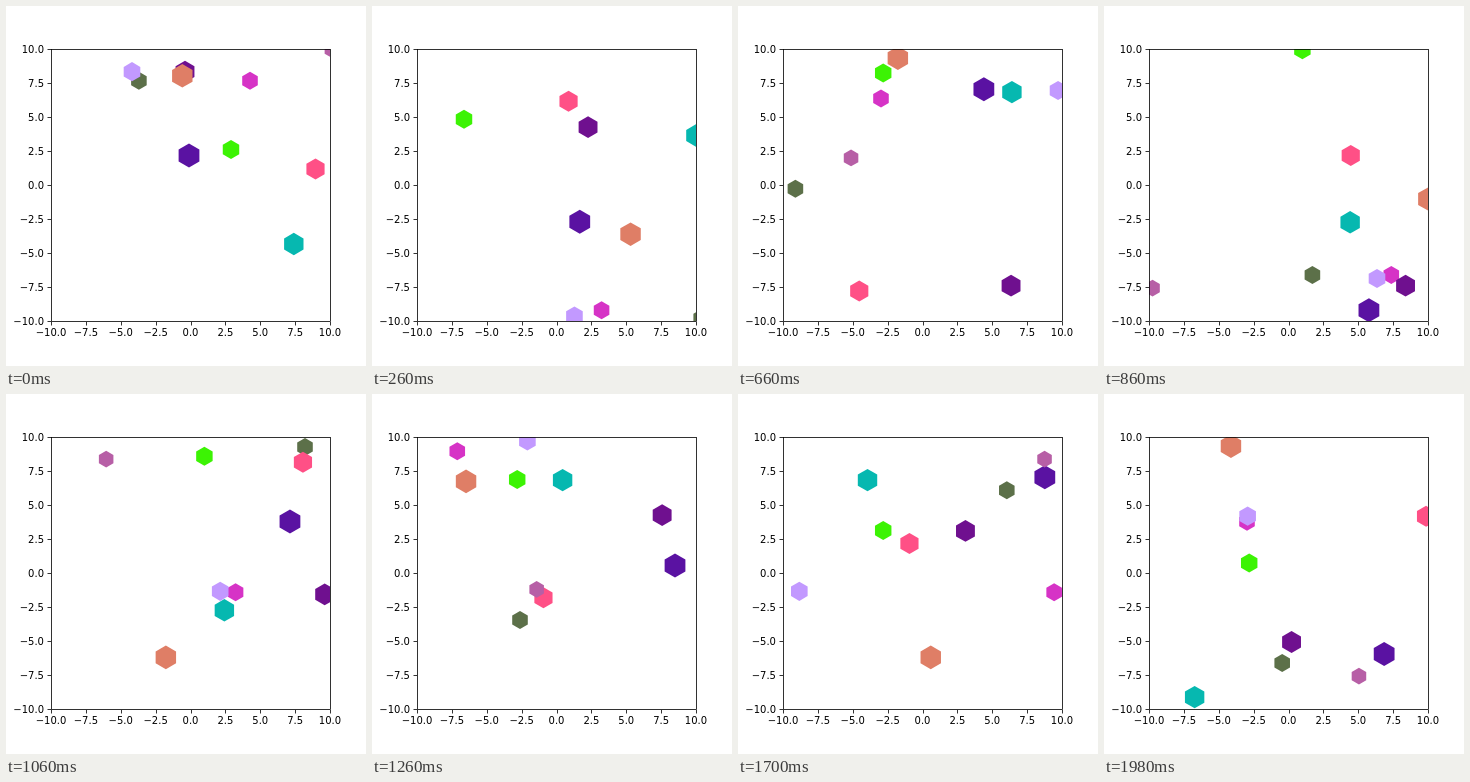
Recreate the animation shown at these times as an HTML page. Size 360 by 360 pixels, loop 2 s.

```html
<!DOCTYPE html>
<html lang="en">
<head>
<meta charset="utf-8">
<title>Bouncing hexagons</title>
<style>
  html, body { margin: 0; width: 100%; height: 100%; overflow: hidden; background: #fff; }
  svg { display: block; width: 100vw; height: 100vh; }
  text { font: 10px "DejaVu Sans", sans-serif; }
  .axes { fill: none; stroke: #000; stroke-width: .8; }
</style>
</head>
<body>
<svg viewBox="0 0 360 360">
  <clipPath id="plot"><rect x="45" y="43" width="279" height="272"/></clipPath>
  <g id="hexagons" clip-path="url(#plot)"></g>
  <path id="ticks" class="axes"/>
  <rect class="axes" x="45.5" y="43.5" width="279" height="272"/>
  <g id="labels"></g>
</svg>
<script>
const STEP = 20, STEPS = 100;
const LEFT = 45, RIGHT = 324, TOP = 43.2, BOTTOM = 315;

// Back to front: colour, radius, start x and y, velocity per step.
const bodies = [
  ['#5c7049', 9, 132.9, 74.7, 15.1, 21.6],
  ['#d633c6', 9, 244, 74.8, 14.43, 17.65],
  ['#6f108f', 10.9, 179, 65.6, 2.85, -7.93],
  ['#df7e66', 11.8, 176.3, 69.8, 16.45, -17.6],
  ['#c299ff', 9.6, 126, 65.7, 5.88, 18.8],
  ['#5a12a2', 12, 183, 149.5, 1.905, -22.1],
  ['#3cf304', 9.5, 225, 143.5, 26.6, -2.32],
  ['#ff5086', 10.5, 309.5, 163, 12.55, -13.55],
  ['#06b8b0', 11.2, 287.8, 238, -0, -21.7],
  ['#b75fa6', 8.4, 325.9, 43.45, -6.45, 21.7]
].map(([color, radius, x, y, vx, vy]) => ({ color, radius, x, y, vx, vy }));
bodies[8].vx = 2.777;

function add(parent, tag, attributes) {
  const node = document.createElementNS('http://www.w3.org/2000/svg', tag);
  for (const name in attributes) node.setAttribute(name, attributes[name]);
  return document.getElementById(parent).appendChild(node);
}

// A body turns round only after it has passed the edge.
function bounce(position, velocity, low, high, steps) {
  for (let i = 0; i < steps; i++) {
    position += velocity;
    if (position > high) velocity = -Math.abs(velocity);
    if (position < low) velocity = Math.abs(velocity);
  }
  return position;
}

function hexagon(radius) {
  return Array.from({ length: 6 }, (_, i) => {
    const angle = i * Math.PI / 3;
    return [radius * Math.sin(angle), radius * Math.cos(angle)].map(n => n.toFixed(2));
  }).join(' ');
}

function drawAxes() {
  let ticks = '';
  for (let i = 0; i <= 8; i++) {
    const x = LEFT + (RIGHT - LEFT) * i / 8;
    const y = BOTTOM - (BOTTOM - TOP) * i / 8;
    const value = (i * 2.5 - 10).toFixed(1).replace('-', '\u2212');
    ticks += `M${Math.round(x) + .5} 316v3.5M45 ${Math.round(y) + .5}h-3.5`;
    add('labels', 'text', { x, y: 330, 'text-anchor': 'middle' }).textContent = value;
    add('labels', 'text', { x: 38, y: y + 3.8, 'text-anchor': 'end' }).textContent = value;
  }
  document.getElementById('ticks').setAttribute('d', ticks);
}

function draw(time) {
  const steps = Math.floor(time % (STEP * STEPS) / STEP);
  for (const { node, x, y, vx, vy } of bodies) {
    const px = bounce(x, vx, LEFT, RIGHT, steps);
    const py = bounce(y, vy, TOP, BOTTOM, steps);
    node.setAttribute('transform', `translate(${px} ${py})`);
  }
}

drawAxes();
for (const body of bodies) {
  body.node = add('hexagons', 'polygon', { points: hexagon(body.radius), fill: body.color });
}

const start = performance.now();
function tick() {
  draw(performance.now() - start);
  requestAnimationFrame(tick);
}
draw(0);
requestAnimationFrame(tick);
</script>
</body>
</html>
```
